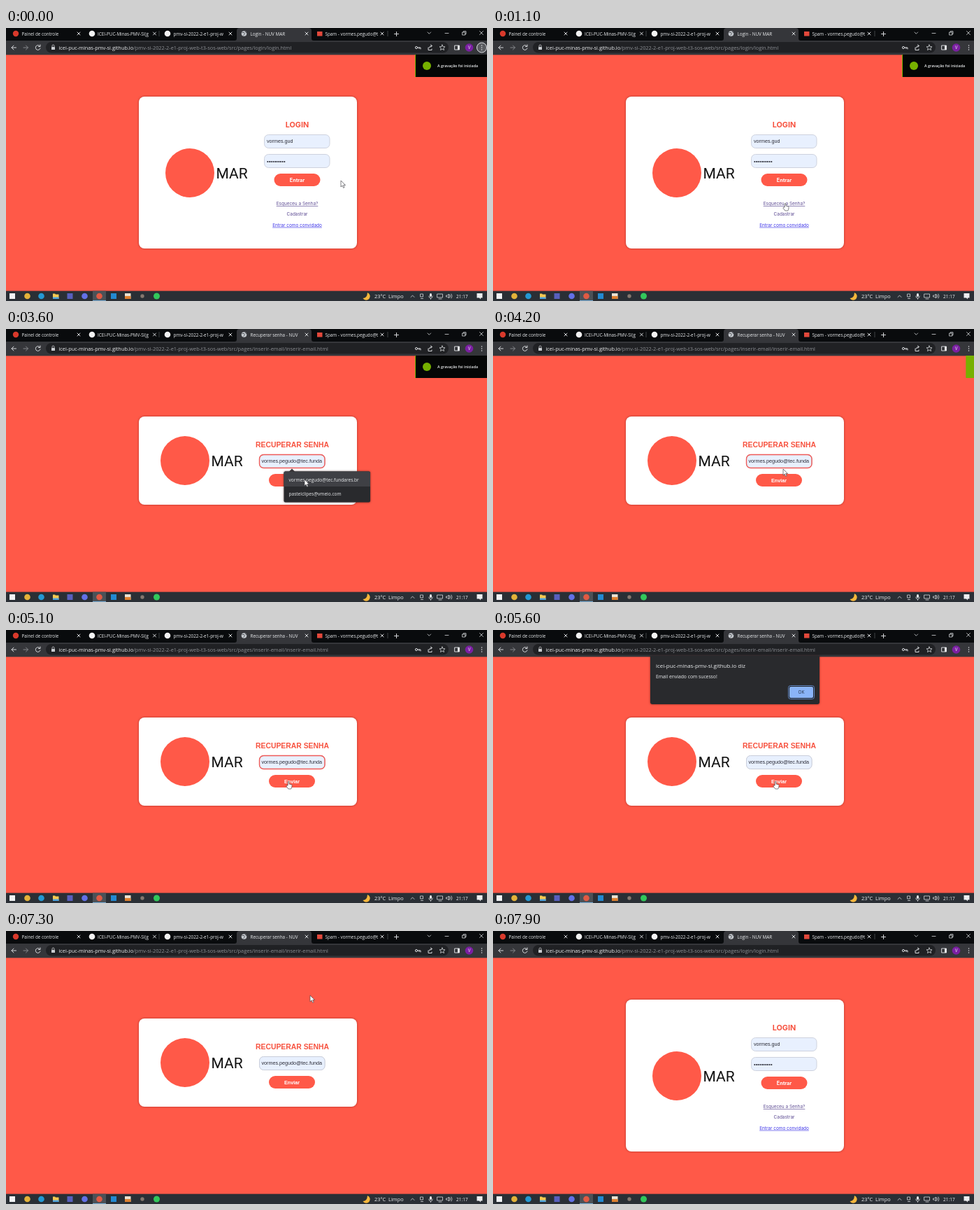
Write an HTML page that moves like this. It is 688 px wide and 390 px high and loops after 8000 ms.

```html
<!DOCTYPE html>
<html lang="pt-BR">
<head>
<meta charset="utf-8">
<title>Recuperar senha</title>
<style>
html, body { margin: 0; width: 100%; height: 100%; overflow: hidden; background: #ff5948; }
svg { display: block; }
text { white-space: pre; }
.ui { font: 6.3px "Open Sans", "Noto Sans", sans-serif; fill: #eceef0; }
.url { font-size: 7.35px; }
.path { fill: #8d9095; }
.form { font: 7.2px "Liberation Sans", Arial, sans-serif; fill: #2b2c36; }
.link { font: 6.45px Inter, sans-serif; fill: #5c4a92; text-anchor: middle; }
.title { font: 700 10.4px "Liberation Sans", Arial, sans-serif; fill: #f7523f; text-anchor: middle; }
.inter { font-family: Inter, sans-serif; }
.button { font-weight: 700; fill: #fff; text-anchor: middle; }
.wordmark { font: 21px Roboto, sans-serif; fill: #111; }
.icon { fill: none; stroke: #d5d7da; stroke-width: 1; stroke-linecap: round; stroke-linejoin: round; }
.thin { stroke-width: .8; }
.card { fill: #fff; filter: drop-shadow(0 .4px 1.6px rgba(80, 0, 0, .5)); }
.field { stroke: #c6cad6; stroke-width: .8; }
.popup { fill: #292a2d; filter: drop-shadow(0 .6px 1.5px rgba(40, 0, 0, .6)); }
.red { fill: #ff5948; }

.timed { animation: 8s step-end infinite; }
.login { animation-name: login; }
.recover { animation-name: recover; }
.ring { animation-name: ring; }
.empty { animation-name: empty; }
.filled { animation-name: filled; }
.focus { animation-name: focus; }
.list { animation-name: list; }
.dialog { animation-name: dialog; }
.hover { animation-name: hover; }
.arrow { animation-name: arrow; }
.hand { animation-name: hand; }
.pointer { animation: travel 8s ease-in-out infinite; }
.toast { animation: toast 8s linear infinite; }
.panel { animation: panel 8s linear infinite; }

@keyframes login { 0%, 93.75% { visibility: visible } 17.5% { visibility: hidden } }
@keyframes recover { 0%, 93.75% { visibility: hidden } 17.5% { visibility: visible } }
@keyframes ring { 0% { visibility: visible } 8.75%, 100% { visibility: hidden } }
@keyframes empty { 0%, 43% { visibility: hidden } 17.5% { visibility: visible } }
@keyframes filled { 0%, 93.75% { visibility: hidden } 43% { visibility: visible } }
@keyframes focus { 0%, 68.75% { visibility: hidden } 36.25% { visibility: visible } }
@keyframes list { 0%, 47.5% { visibility: hidden } 37.5% { visibility: visible } }
@keyframes dialog { 0%, 91.25% { visibility: hidden } 68.75% { visibility: visible } }
@keyframes hover { 0%, 91.25% { visibility: hidden } 85% { visibility: visible } }
@keyframes arrow {
  0%, 38.75%, 78% { visibility: visible }
  8%, 55%, 92%, 100% { visibility: hidden }
}
@keyframes hand {
  0%, 17.5%, 78%, 100% { visibility: hidden }
  8%, 55% { visibility: visible }
}
@keyframes travel {
  0%, 1.25% { transform: translate(479px, 218px) }
  8.75%, 17.5% { transform: translate(418px, 250px) }
  18%, 38.75% { transform: translate(409px, 192px) }
  43.75%, 47.5% { transform: translate(427px, 215px) }
  52.5% { transform: translate(415px, 200px) }
  56.25%, 77.5% { transform: translate(404px, 216px) }
  86.25%, 100% { transform: translate(435px, 92px) }
}
@keyframes toast {
  0%, 50.5% { transform: none }
  52.5% { transform: translateX(91px) }
  53%, 100% { transform: translateX(104px) }
}
@keyframes panel {
  0%, 47.5% { transform: none }
  50.5%, 100% { transform: translateX(103px) }
}
</style>
</head>
<body>
<svg width="688" height="390" viewBox="0 0 688 390">
  <defs>
    <path id="close" class="icon" d="M-2-2 2 2M2-2-2 2"/>
    <g id="brand">
      <circle class="red" r="35"/>
      <text class="wordmark" x="37.5" y="8">MAR</text>
    </g>
    <rect id="pill" class="red" x="-33" y="-9" width="66" height="18" rx="9"/>
    <rect id="field" class="field" width="93.5" height="19" rx="6"/>
    <clipPath id="inner"><rect x="364" y="180" width="90" height="18"/></clipPath>
  </defs>

  <rect class="red" width="688" height="390"/>

  <!-- Browser frame -->
  <g class="ui">
    <rect width="688" height="19" fill="#090b0d"/>
    <rect y="18" width="688" height="20.4" fill="#35363a"/>
    <path d="M327 18q3 0 3-3V4q0-4 4-4h99q4 0 4 4v11q0 3 3 3z" fill="#35363a"/>
    <circle cx="14" cy="8" r="4.2" fill="#d8392b"/>
    <circle cx="123" cy="8" r="4.3" fill="#f3f3f3"/>
    <circle cx="231" cy="8" r="4.3" fill="#f3f3f3"/>
    <circle cx="340.5" cy="8" r="3.8" fill="#c3c7cc"/>
    <path d="M337.5 6.5h3l1 2-2 2M342 5l2 2" fill="none" stroke="#55585d"/>
    <rect x="445" y="5" width="7.5" height="6.5" fill="#e2483b"/>
    <text x="22.5" y="10.7">Painel de controle</text>
    <text x="131" y="10.7">ICEI-PUC-Minas-PMV-SI(g</text>
    <text x="239.5" y="10.7">pmv-si-2022-2-e1-proj-w</text>
    <text x="456.5" y="10.7">Spam - vormes.pegudo@t</text>
    <use href="#close" x="104" y="8"/>
    <use href="#close" x="212.5" y="8"/>
    <use href="#close" x="321" y="8"/>
    <use href="#close" x="430" y="8"/>
    <use href="#close" x="538" y="8"/>
    <path class="icon" d="M555.5 8.500h6M558.5 5.500v6"/>
    <path d="M219 4v8M546 4v8" stroke="#5a5d61" stroke-width=".7"/>
    <path class="icon thin" d="M603 6l2.300 2.300L607.600 6M628 7.500h5M653 6h3.800v4H653zM654.200 6V4.700h3.800v4h-1.200M677.500 4.500l5 5M682.500 4.500l-5 5"/>

    <rect x="57" y="20" width="576" height="15.5" rx="7.7" fill="#202124"/>
    <path class="icon" d="M14.500 28H8M11 25l-3 3 3 3"/>
    <path class="icon" d="M25 28h6.500M28.500 25l3 3-3 3" style="stroke:#85878b"/>
    <path class="icon" d="M48.500 26A3.400 3.400 0 1 0 49 29M49 24v2.500h-2.500"/>
    <rect x="65" y="27" width="5" height="4" rx=".5" fill="#c9ccd0"/>
    <path class="icon thin" d="M66 27v-1.500a1.500 1.500 0 0 1 3 0V27"/>
    <circle class="icon" cx="587" cy="28" r="1.600"/>
    <path class="icon" d="M589 28h4v2M591 28v1.500M604 28v3.500h5V30M605 28.500q.5-3 4-3M607.500 24l2 1.500-2 1.700"/>
    <path class="icon thin" d="M624 24l1.100 2.600 2.900.2-2.200 1.900.7 2.800-2.500-1.500-2.500 1.500.7-2.800-2.200-1.900 2.900-.2z"/>
    <rect class="icon" x="642" y="25" width="6.500" height="6"/>
    <path d="M646 25h2.500v6H646z" fill="#e8eaed"/>
    <circle cx="662.5" cy="28" r="5.8" fill="#7b1fa2"/>
    <text x="662.5" y="30.2" text-anchor="middle">V</text>
    <circle class="timed ring" cx="680.5" cy="28" r="7" fill="#5b5c60" stroke="#e2e4e8"/>
    <path d="M680.500 25v.01M680.500 28v.01M680.500 31v.01" stroke="#e8eaed" stroke-width="1.500" stroke-linecap="round"/>
  </g>

  <!-- Login page -->
  <g class="timed login">
    <g class="ui">
      <text x="349.5" y="10.7">Login - NUV MAR</text>
      <text class="url" x="75.5" y="30.5">icei-puc-minas-pmv-si.github.io<tspan class="path">/pmv-si-2022-2-e1-proj-web-t3-sos-web/src/pages/login/login.html</tspan></text>
    </g>
    <rect class="card" x="190" y="98" width="312" height="217" rx="8"/>
    <use href="#brand" x="263" y="207"/>
    <text class="title inter" x="416.5" y="142.2" style="font-size:10.8px">LOGIN</text>
    <use href="#field" x="369.5" y="152.5" fill="#e8f0fe"/>
    <use href="#field" x="369.5" y="180.5" fill="#e8f0fe"/>
    <use href="#pill" x="416.5" y="217"/>
    <g class="form">
      <text x="373" y="164.3">vormes.gud</text>
      <text x="373" y="192.7" style="font-size:7.6px">••••••••••</text>
      <text class="button inter" x="416.5" y="219.7">Entrar</text>
    </g>
    <text class="link" x="416.5" y="253" text-decoration="underline">Esqueceu a Senha?</text>
    <text class="link" x="416.5" y="268.2">Cadastrar</text>
    <text class="link" x="416.5" y="283.7" text-decoration="underline" style="fill:#4038e8">Entrar como convidado</text>
  </g>

  <!-- Password recovery page -->
  <g class="timed recover">
    <g class="ui">
      <text x="349.5" y="10.7">Recuperar senha - NUV</text>
      <text class="url" x="75.5" y="30.5">icei-puc-minas-pmv-si.github.io<tspan class="path">/pmv-si-2022-2-e1-proj-web-t3-sos-web/src/pages/inserir-email/inserir-email.html</tspan></text>
    </g>
    <rect class="card" x="190" y="125" width="312" height="126" rx="8"/>
    <use href="#brand" x="256" y="188"/>
    <text class="title" x="409.5" y="168.5">RECUPERAR SENHA</text>
    <use href="#field" x="362.5" y="179.5" fill="#fff"/>
    <use href="#pill" x="409" y="216"/>
    <text class="form button" x="409" y="218.6">Enviar</text>
  </g>
  <text class="form timed empty" x="366" y="191.5" style="fill:#a9a9ad">Insira seu e-mail</text>
  <g class="timed filled">
    <use href="#field" x="362.5" y="179.5" fill="#e8f0fe"/>
    <text class="form" x="365.5" y="191.3" clip-path="url(#inner)">vormes.pegudo@tec.funda</text>
  </g>
  <rect class="timed focus" x="362.5" y="179.5" width="93.5" height="19" rx="6" fill="none" stroke="#ef5b58" stroke-width="1.4"/>

  <g class="ui timed list">
    <path d="M404 204.500l5-5 5 5z" fill="#3f4044"/>
    <rect class="popup" x="397.5" y="203.5" width="123.5" height="44" rx="2"/>
    <path d="M397.500 225v-19.500q0-2 2-2H519q2 0 2 2V225z" fill="#3f4045"/>
    <g style="font-size:6.55px">
      <text x="404.5" y="218.3">vormes.pegudo@tec.fundares.br</text>
      <text x="404.5" y="238.3">pastelclipes@vmeio.com</text>
    </g>
  </g>

  <g class="ui timed dialog">
    <path class="popup" d="M225 37h242v66q0 3-3 3H228q-3 0-3-3z"/>
    <text x="233" y="53.5" style="font-size:7.95px">icei-puc-minas-pmv-si.github.io diz</text>
    <text x="233" y="69" style="font-size:6.75px">Email enviado com sucesso!</text>
    <rect x="422.5" y="79.5" width="37" height="19" rx="3" fill="#202124" stroke="#6288c4"/>
    <rect x="424" y="81" width="34" height="16" rx="2" fill="#8ab4f8"/>
    <rect class="timed hover" x="424" y="81" width="34" height="16" rx="2" fill="#7398d4"/>
    <text x="441" y="91.3" text-anchor="middle" fill="#202b3d">OK</text>
  </g>

  <!-- Recording notice -->
  <g class="toast">
    <rect x="585" y="38" width="103" height="32" fill="#76b000"/>
    <g class="panel">
      <rect x="586" y="38" width="103" height="32" fill="#050606"/>
      <circle cx="602" cy="54" r="6" fill="#76b000"/>
      <text class="ui" x="617" y="56.3" style="font-size:5.4px;font-weight:600">A gravação foi iniciada</text>
    </g>
  </g>

  <!-- Taskbar -->
  <g class="ui">
    <rect y="375.6" width="688" height="14.4" fill="#2a2f35"/>
    <rect x="124" y="375.6" width="19" height="14.4" fill="#4b5157"/>
    <path d="M124 389.500h19" stroke="#79aed6"/>
    <rect x="5" y="379" width="8" height="8" fill="#f1f3f5"/>
    <circle cx="30.5" cy="383" r="4.3" fill="#e3b23a"/>
    <circle cx="50.5" cy="383" r="4.3" fill="#2498d3"/>
    <path d="M67 379.500h3l1 1h4.500v6.500H67z" fill="#f5c951"/>
    <rect x="67" y="384.5" width="8.5" height="2.5" fill="#4ea4df"/>
    <rect x="87.5" y="379" width="8" height="8" fill="#5960bd"/>
    <circle cx="112.5" cy="383" r="4.3" fill="#6370e6"/>
    <circle cx="133.5" cy="383" r="4.3" fill="#e05a43"/>
    <rect x="150" y="379" width="8" height="8" fill="#2389d1"/>
    <rect x="170" y="379" width="8.5" height="8" fill="#e9e1d2"/>
    <path d="M170 383h8.500v4H170z" fill="#df812f"/>
    <circle cx="195" cy="383" r="2.7" fill="#85786f"/>
    <circle cx="215.5" cy="383" r="4.5" fill="#32c75b"/>
    <path d="M517 378a5.500 5.500 0 1 1-6.500 8q6 0 6.500-8z" fill="#f6b73c"/>
    <text x="527" y="386" style="font-size:7.4px">23°C  Limpo</text>
    <path class="icon thin" d="M579 384.500l2.500-2.500 2.500 2.500M593 380h3.500v4H593zM593.500 386.500h3"/>
    <rect x="606" y="379" width="3" height="5" rx="1.5"/>
    <path class="icon thin" d="M604.800 383q0 3 2.700 3t2.700-3M607.500 386v1.500M617 380h7.500v5H617zM619 387h4M630 382h1.500l2-2v6l-2-2H630zM635 381q1.500 2 0 4M637 380q2 3 0 6"/>
    <text x="644" y="385.8" style="font-size:6.5px">21:17</text>
    <path d="M673.500 379h8v6.500h-2.500v2l-2-2h-3.500z"/>
  </g>

  <g class="pointer" stroke="#4a4a50" stroke-width=".7" fill="#fff">
    <path class="timed arrow" d="M0 0v9l2.100-1.900 1.500 3.300 1.500-.7-1.400-3.200h2.800z"/>
    <path class="timed hand" d="M-.8 6V1q.9-1.400 1.800 0v3l3.300.9q.9.400.8 1.600L4.500 9.500 3.800 11H-.2L-3 7.300q-.3-1.400 1-1.100z"/>
  </g>
</svg>
</body>
</html>
```
